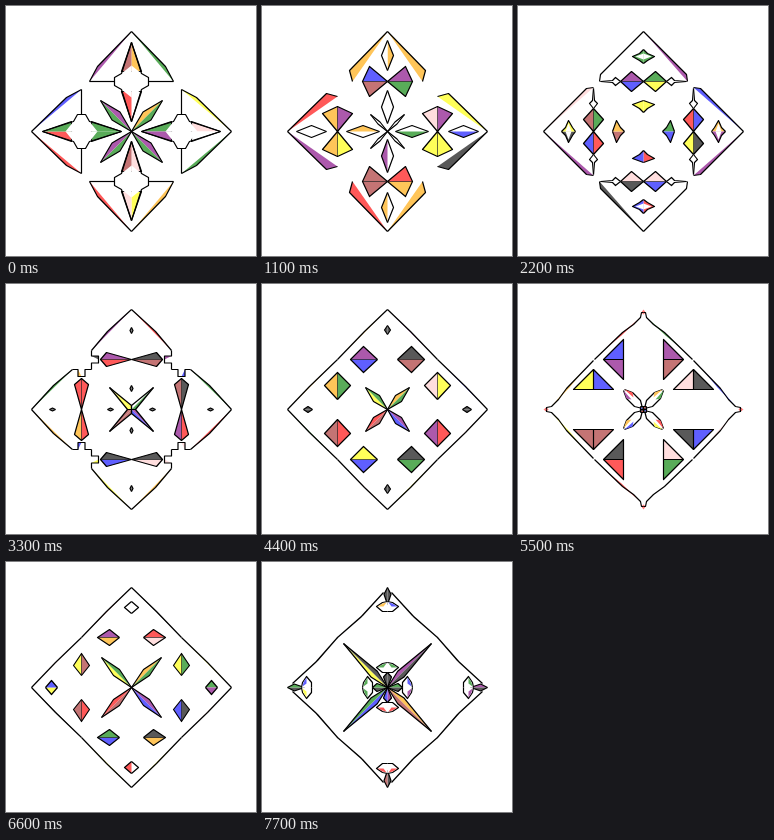
An HTML page with a canvas that plays this animation: 250x250 px, repeating every 8000 ms.

```html
<!DOCTYPE html>
<html>
<head>
<meta charset="utf-8">
<style>
html, body { margin: 0; width: 100%; height: 100%; overflow: hidden; background: #fff; }
canvas { display: block; width: 100vmin; height: 100vmin; }
</style>
</head>
<body>
<canvas id="stage" width="250" height="250"></canvas>
<script>
const ctx = document.getElementById('stage').getContext('2d');
const LOOP = 8000, HOLD = 1100, MID = 50, TIP = 100;
const paint = {
  r: '#ff5959', g: '#59ac59', b: '#5f5fff', y: '#ffff59', o: '#ffc559',
  p: '#ac59ac', k: '#595959', n: '#c47474', i: '#ffdede', w: '#ffffff'
};

// A color name is one letter for all octants or one letter for each.
// Octants run clockwise from the upper right.
const colorAt = (colors, k) => paint[colors[k % colors.length]];

function randomColors(seed) {
  const keys = Object.keys(paint);
  let out = '';
  for (let k = 0; k < 8; k++) {
    seed = (seed * 1103515245 + 12345) % 2147483648;
    out += keys[Math.floor(seed / 2147483648 * keys.length)];
  }
  return out;
}

// Points are [distance out along an arm, distance to its side].
function octants(pts, draw) {
  for (let k = 0; k < 8; k++) {
    const turn = (k + 1 >> 1) * Math.PI / 2, side = k % 2 ? -1 : 1;
    const c = Math.cos(turn), s = Math.sin(turn);
    ctx.beginPath();
    for (const [u, v] of pts) {
      const x = side * v, y = -u;
      ctx.lineTo(125.5 + x * c - y * s, 125.5 + x * s + y * c);
    }
    draw(k);
  }
}

function fill(colors, ...pts) {
  octants(pts, k => { ctx.fillStyle = colorAt(colors, k); ctx.fill(); });
}

function line(...pts) {
  octants(pts, () => ctx.stroke());
}

function shape(colors, ...pts) {
  fill(colors, ...pts);
  line(...pts);
}

// Kite on the arm, widest at the given share of its length.
function gem(colors, from, to, width, at = 0.5) {
  shape(colors, [from, 0], [from + (to - from) * at, width], [to, 0]);
}

// Concave star on the arm with a pale core.
function star(colors, center, long, wide) {
  shape(colors, [center + long, 0], [center + 3, 4], [center, wide], [center - 4, 4], [center - long, 0]);
  fill('w', [center + 3, 0], [center, wide - 3], [center - 3, 0]);
}

// Slim spike along the diagonal.
function ray(colors, length, width, at = 0.5) {
  shape(colors, [0, 0], [length * at + width, length * at - width], [length, length]);
}

// Two mirrored triangles across the middle of the arm, with a seam between.
function pair(outer, inner, start, widest, rise, end) {
  const a = [MID, start], b = [MID, end];
  const top = [MID + rise, widest], low = [MID - rise, widest];
  fill(outer, a, top, b);
  fill(inner, a, low, b);
  ctx.lineWidth = 0.6;
  line(a, b);
  ctx.lineWidth = 1.2;
  line(a, top, b, low, a);
}

// Outer border with a colored splinter behind its bend.
function rim(colors, bend, end) {
  const tip = [TIP, 0];
  fill(colors, tip, bend, end);
  line(tip, bend, end);
}

const scenes = [
  () => {
    rim('gygorrbp', [65, 34], [MID, 42]);
    line([MID, 42], [MID, 17]);
    gem('oiwyirgn', 89, 60, 10, 1);
    gem('wgpinggr', 10, 40, 10, 1);
    const bump = [[58, 10], [54, 17], [46, 17], [42, 10]];
    fill('w', [66, 0], ...bump, [34, 0]);
    line([89, 0], ...bump, [10, 0]);
    ray('ogpggpgp', 31, 4);
  },
  () => {
    rim('oykorpro', [61, 38], [MID, 35]);
    gem('owbwowww', 91, 61, 6);
    gem('wwgwpwow', 41, 8, 6);
    pair('ppyonoob', 'giyrnypn', 0, 18, 15, 25);
    ray('w', 17, 1);
  },
  () => {
    rim(randomColors(7), [57, 43], [MID, 44]);
    star('goprbkyg', 75, 7, 11);
    shape('ygbrbnoy', [31, 0], [27, 11], [23, 4], [19, 0]);
    pair('gbkbkbnp', 'yryiirgb', 0, 12, 10, 23);
    for (const d of [4, -4]) {
      shape('w', [MID, 23], [MID + d, 28], [MID + d / 4, 31], [MID, 43]);
    }
  },
  () => {
    rim('rgroyogp', [78, 24], [59, 40]);
    const half = 3.5, deep = 33;
    fill(randomColors(3), [MID + half, 40], [MID, deep], [MID + half, deep]);
    line([59, 40], [MID + half, 40], [MID + half, deep], [MID - half, deep], [MID - half, 40], [40, 40]);
    pair('kkriborp', 'nnpkkrrr', 0, 25, 7, 31);
    for (const u of [79, 21]) gem('k', u - 3, u + 3, 1.5);
    shape('wgpbnnyy', [0, 0], [4, 0], [22, 22]);
  },
  () => {
    rim(randomColors(5), [78, 23], [MID, MID]);
    pair('kyrgbnop', 'nipkyrgb', 10, 24, 13, 37);
    gem('k', 75, 84, 3);
    ray('ogpbnryg', 22, 3);
  },
  () => {
    const neck = [92, 3], bend = [77, 21], end = [MID, 49];
    fill('gbiwryor', neck, bend, [60, 39], [74, 22]);
    fill('r', [TIP, 0], [97, 2], [95, 0]);
    line([97, 0], [97, 2], neck, [85, 10], bend, end);
    pair('pkbgrnyb', 'nikiknbp', 20, 20, 0, 40);
    const top = [70, 20], low = [30, 20], seam = [MID, 20], corner = [MID, 40];
    fill('pkbgrnyb', seam, top, corner);
    fill('nikiknbp', seam, low, corner);
    line(seam, corner, top, low, corner);
    shape('w', [1, 1], [9, 3], [17, 11], [20, 19]);
    fill('ogrybopr', [12, 10], [17, 11], [20, 19]);
    shape('rkbk', [0, 0], [3, 0], [3, 3]);
  },
  () => {
    rim(randomColors(11), [76, 25], [MID, MID]);
    pair('rgkobnyp', 'iybkgrno', 12, 22, 8, 34);
    gem('wgpwrybw', 86, 74, 7);
    ray('ogpbnryg', 30, 3);
  },
  () => {
    shape('ngkoobnr', [95, 4], [70, 27], [MID, MID], [72, 25], [95, 4]);
    gem('kpkknkgk', TIP, 83, 3.5, 0.4);
    ray('pkonbgyk', 44, 3, 0.3);
    for (const u of [81, 20]) {
      shape('w', [u + 5, 0], [u + 4, 5], [u, 11], [u - 5, 5], [u - 5, 0]);
      fill(u > MID ? 'bgprrybo' : 'gbprrggg', [u + 4, 1], [u + 3, 5], [u, 10], [u, 4]);
    }
    gem('kgkpbkgk', 0, 15, 4, 0.7);
  }
];

let shown = -1;
function frame(now) {
  const index = Math.floor(now % LOOP / HOLD);
  if (index !== shown) {
    shown = index;
    ctx.fillStyle = '#fff';
    ctx.fillRect(0, 0, 250, 250);
    ctx.strokeStyle = '#000';
    ctx.lineWidth = 1.2;
    ctx.lineJoin = 'round';
    scenes[index]();
  }
  requestAnimationFrame(frame);
}
frame(performance.now());
</script>
</body>
</html>
```
